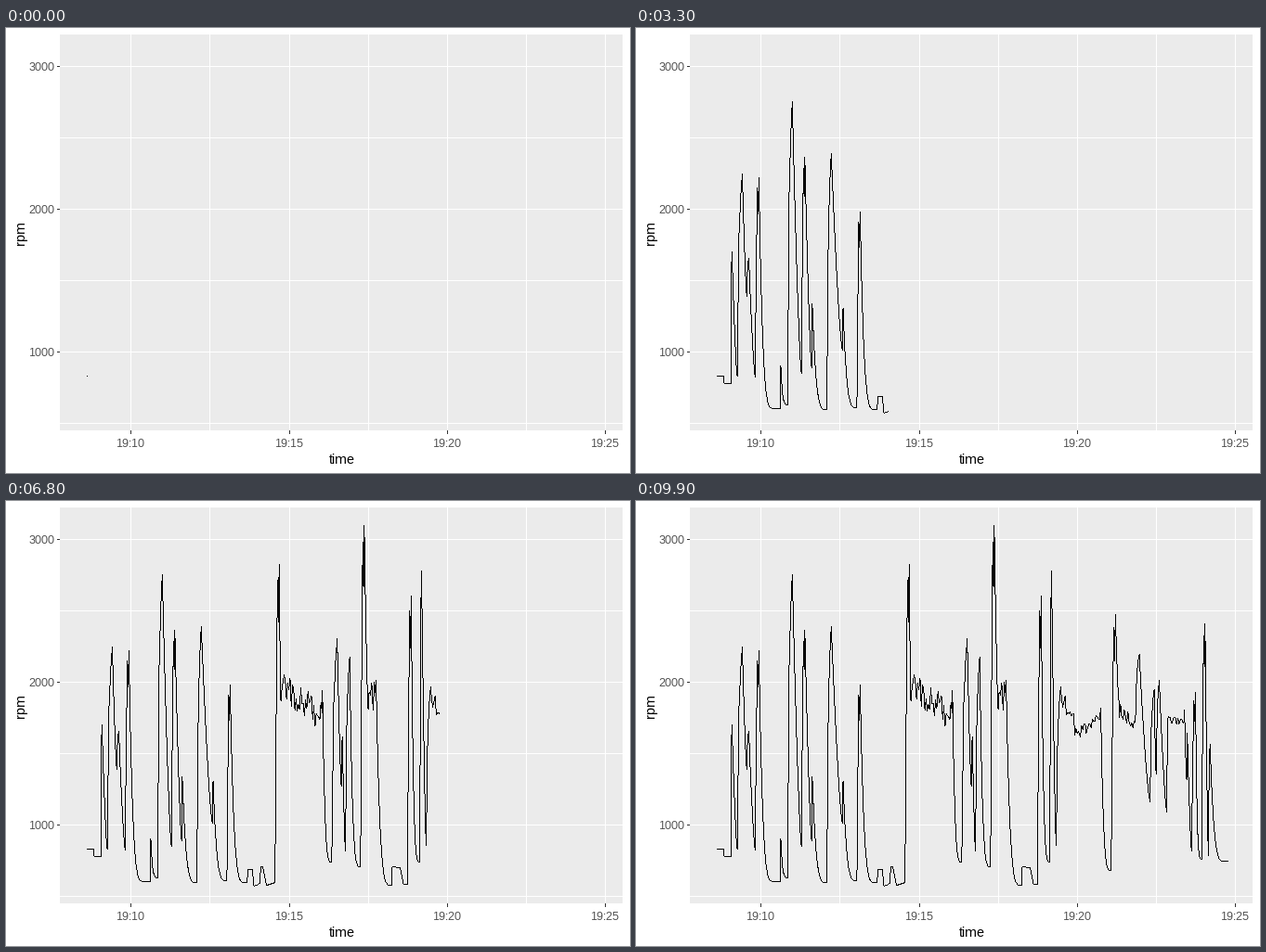
Recreate the animation shown at these times as a matplotlib script. Size 672x480 px, loop 10 s.

```python
import numpy as np
import matplotlib.pyplot as plt
from matplotlib.animation import FuncAnimation
from matplotlib.patches import Rectangle

W, H, DPI = 672, 480, 96
FRAMES, INTERVAL = 100, 100
LEFT, RIGHT, TOP, BOTTOM = 57.5, 663.5, 6.5, 433.5
PX = 72 / DPI      # one pixel in points
IDLE = 385         # below this level the engine settles at idle

plt.rcParams.update({"font.family": "Liberation Sans",
                     "text.hinting": "native", "text.hinting_factor": 1})
rng = np.random.default_rng(7)
path = []


def cruise(x0, x1, y0, y1, noise=0):
    """Steady speed from x0, y0 to x1, y1 with random wobble."""
    n = max(2, round((x1 - x0) / 1.25))
    wobble = rng.uniform(-noise, noise, n)
    path.extend(zip(np.linspace(x0, x1, n), np.linspace(y0, y1, n) + wobble))


def rev(x_top, top, x_end, floor):
    """Rise from the last point to a top, then fall to a floor."""
    x0, y0 = path[-1]
    w, h = x_top - x0, y0 - top
    shift = h > 150 and 2.5 < w < 4.6   # gear change on a quick climb
    climb = ((.3, .45), (.6, .05), (.8, .18)) if shift else ((.35, .3), (.7, .1))
    path.extend((x0 + u * w, top + v * h) for u, v in climb)

    fall, power = x_end - x_top, 1.4
    if floor > IDLE:
        fall, power = min(fall, 16), 4
    u = np.linspace(0, 1, 9)
    path.extend(zip(x_top + fall * u, floor - (floor - top) * (1 - u) ** power))
    path.append((x_end, floor))


def revs(*pulses):
    for pulse in pulses:
        rev(*pulse)


def rasterise(points):
    """One-pixel line: a sample per pixel along each stroke's longer axis."""
    xs, ys = [], []
    for (x0, y0), (x1, y1) in zip(points, points[1:]):
        n = int(np.ceil(max(abs(x1 - x0), abs(y1 - y0)))) + 1
        xs.append(np.linspace(x0, x1, n))
        ys.append(np.linspace(y0, y1, n))
    return np.concatenate(xs), np.concatenate(ys)


# The trip in stage pixels: pulses of (top x, top y, end x, floor y).
cruise(87, 94, 375, 375)
cruise(94.5, 101.5, 383, 383)
revs((102.8, 241, 108.5, 375), (114, 157, 118.8, 289), (121, 248, 127.8, 376),
     (131.8, 161, 155, 410), (155.4, 364, 162.7, 406), (167.8, 79, 177.6, 372),
     (181.3, 139, 188.6, 366), (189.3, 297, 205, 411), (209.8, 135, 221.7, 347),
     (222.5, 302, 237.4, 409), (240.8, 198, 259.3, 411))
cruise(259.8, 264.8, 397, 397)
cruise(266.5, 273, 415, 412)
cruise(273.8, 276, 394, 394)
cruise(280, 289.2, 414, 411)
rev(293.7, 68, 295.5, 215)
cruise(296.5, 340, 203, 230, 18)
revs((340.3, 204, 350.3, 389), (356.2, 148, 360.6, 307), (361.7, 254, 365, 377),
     (369.6, 168, 381.3, 394), (385.3, 26, 389.5, 224))
cruise(390.5, 397.7, 215, 203, 18)
rev(398, 193, 415, 414)
cruise(415.5, 424, 394, 395)
cruise(427.5, 431.8, 413, 413)
revs((435.8, 102, 445.2, 389), (447, 75, 452, 371), (456.8, 200, 458, 212))
cruise(459, 476, 212, 252, 12)
cruise(478, 500, 250, 228, 7)
revs((500.2, 235, 511.2, 398), (515.8, 122, 519.5, 215))
cruise(520, 537.3, 226, 243, 8)
revs((541.5, 165, 553, 324), (557.5, 203, 559.7, 294), (563, 193, 571, 335))
cruise(572, 590, 235, 235, 5)
revs((590.2, 225, 592.5, 300), (593.2, 250, 597.8, 377), (602, 206, 608.6, 386),
     (612.3, 132, 616, 382), (617.7, 262, 636.5, 388))

xs, ys = rasterise(path)
cols, rows = (np.floor(v + 0.5).astype(int) for v in (xs, ys))

fig = plt.figure(figsize=(W / DPI, H / DPI), dpi=DPI, facecolor="white")
ax = fig.add_axes([0, 0, 1, 1])
ax.axis("off")


def stroke(x, y, color):
    ax.plot(x, y, color=color, lw=PX, snap=False, solid_capstyle="butt")


def label(x, y, text, size, color="black", **kw):
    ax.text(x, y, text, size=size * PX, color=color, va="baseline", **kw)


ax.add_patch(Rectangle((LEFT, TOP), RIGHT - LEFT, BOTTOM - TOP,
                       fc="#EBEBEB", lw=0, snap=False))
for x in (134, 219, 305, 390, 475, 560, 645):
    stroke((x, x), (TOP, BOTTOM), "white")
for y in range(41, 434, 77):
    stroke((LEFT, RIGHT), (y, y), "white")

for x, minute in zip((134, 305, 475, 645), (10, 15, 20, 25)):
    stroke((x, x), (BOTTOM, BOTTOM + 4), "#333333")
    label(x, 451.5, f"19:{minute}", 12, "#4D4D4D", ha="center")
for y, rpm in zip((41, 195, 349), (3000, 2000, 1000)):
    stroke((LEFT - 3, LEFT), (y, y), "#333333")
    label(52, y + 4.5, str(rpm), 12, "#4D4D4D", ha="right")
label(361, 469.5, "time", 15, ha="center")
label(19, 220, "rpm", 15, ha="center", rotation=90, rotation_mode="anchor")

layer = np.zeros((H, W, 4), np.uint8)
trace = ax.imshow(layer, extent=(-0.5, W - 0.5, H - 0.5, -0.5), aspect="auto",
                  interpolation="nearest", zorder=3)
ax.set_xlim(-0.5, W - 0.5)
ax.set_ylim(H - 0.5, -0.5)


def update(i):
    seen = xs <= 87.3 + 5.575 * i
    ink = layer.copy()
    ink[rows[seen], cols[seen], 3] = 255
    trace.set_data(ink)
    return trace,


anim = FuncAnimation(fig, update, frames=FRAMES, interval=INTERVAL,
                     repeat=True, repeat_delay=0, blit=False)
plt.show()
```
